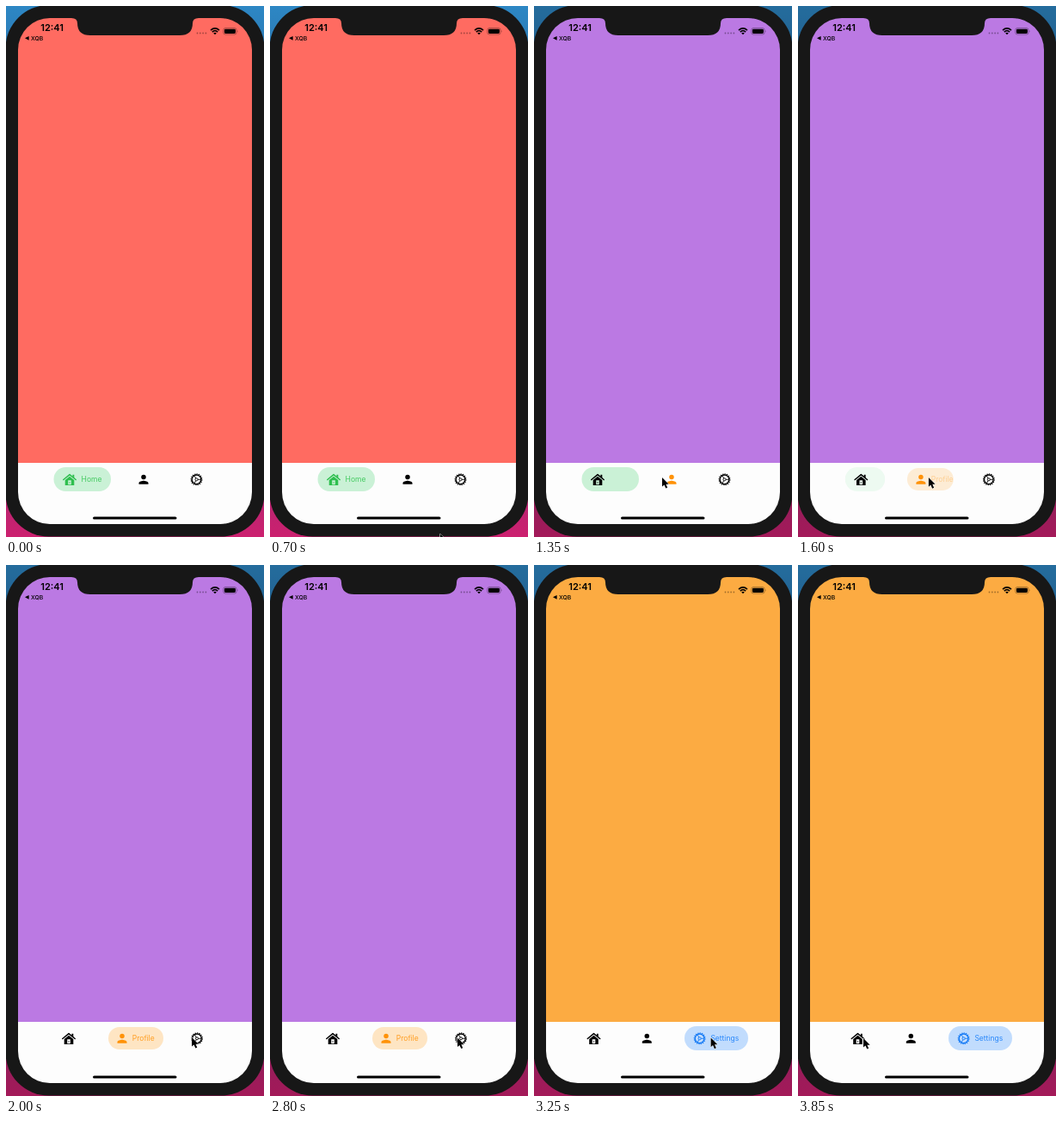
An HTML page that plays this animation: 300 by 616 pixels, repeating every 3.9 s.

```html
<!DOCTYPE html>
<html lang="en">
<head>
<meta charset="utf-8">
<title>Tab bar</title>
<style>
  html, body { margin: 0; width: 100%; height: 100%; overflow: hidden; }
  svg { display: block; width: 300px; height: 616px; font-family: Inter, "Liberation Sans", sans-serif; }
</style>
</head>
<body>
<svg viewBox="0 0 300 616" xmlns="http://www.w3.org/2000/svg">
  <defs>
    <linearGradient id="wall" x1="0" y1="0" x2="0" y2="1">
      <stop offset="0" stop-color="#2d87c4"/>
      <stop offset=".4" stop-color="#2a4c80"/>
      <stop offset="1" stop-color="#cc206f"/>
    </linearGradient>
    <clipPath id="display"><rect x="14" y="14" width="272" height="587" rx="37"/></clipPath>
  </defs>

  <rect width="300" height="616" fill="url(#wall)"/>
  <rect id="shade" width="300" height="616" fill="#000"/>
  <rect x="-.5" y="-1" width="301" height="616.5" rx="50" fill="#171717"/>

  <g clip-path="url(#display)">
    <rect id="page" x="14" y="14" width="272" height="516"/>
    <rect x="14" y="530" width="272" height="72" fill="#fdfdfd"/>
  </g>
  <path fill="#171717" d="M76 13V14Q83 14 83 20Q83 34 98 34H202Q217 34 217 20Q217 14 224 14V13Z"/>

  <text x="40.3" y="29" font-size="11" font-weight="600">12:41</text>
  <path d="M22 37.3L26.6 34.9V39.7Z"/>
  <text x="29" y="39.8" font-size="6.8" font-weight="500">XQB</text>
  <g fill="#000" fill-opacity=".35">
    <circle cx="222.5" cy="31.5" r=".9"/><circle cx="225.8" cy="31.5" r=".9"/>
    <circle cx="229.1" cy="31.5" r=".9"/><circle cx="232.4" cy="31.5" r=".9"/>
  </g>
  <g fill="none" stroke="#000" stroke-width="1.6">
    <path d="M238 28.1Q243 23.7 248 28.1"/>
    <path d="M239.8 30.1Q243 27.3 246.2 30.1"/>
  </g>
  <path d="M241.2 31.4Q243 30 244.8 31.4L243 33.3Z"/>
  <rect x="252.8" y="25.6" width="15.2" height="7.4" rx="2.2" fill="none" stroke="#000" stroke-opacity=".45" stroke-width=".7"/>
  <rect x="253.9" y="26.7" width="13" height="5.2" rx="1.3"/>
  <path d="M268.9 28V30.6Q270 29.3 268.9 28Z" fill-opacity=".5"/>

  <g id="tabs"></g>
  <rect x="101" y="592.4" width="97.5" height="3.2" rx="1.6"/>
  <path id="cursor" d="M0 0V10.6L2.4 8.4L4.3 12.6L6.2 11.8L4.4 7.7H7.7Z" stroke="#fff" stroke-width=".9" paint-order="stroke"/>
</svg>

<script>
const LOOP = 3900, STEP = 50, MORPH = 400, MID = 549;
const $ = id => document.getElementById(id);

const houseIcon = `
  <path d="M-7.2 .2L0 -5.7L7.2 .2" fill="none" stroke="currentColor" stroke-width="1.5" stroke-linecap="round" stroke-linejoin="round"/>
  <path d="M3.4 -5.6H5.3V-1.4L3.4 -3Z"/>
  <path fill-rule="evenodd" d="M0 -3.6L5.3 .8V6.7H-5.3V.8ZM-1.8 1V6H1.8V1Z"/>
  <circle cy="3.6" r=".7"/>`;
const personIcon = `
  <path transform="scale(.69) translate(-12 -12)" d="M12 12a4 4 0 1 0 0-8a4 4 0 0 0 0 8zm0 2c-2.67 0-8 1.34-8 4v2h16v-2c0-2.66-5.33-4-8-4z"/>`;
const gearIcon = `
  <g fill="none" stroke="currentColor">
    <circle r="5.3" stroke-width="1.3"/>
    <circle r="6.3" stroke-width="1.3" pathLength="32" stroke-dasharray="1.1 .9"/>
    <circle r="1.5" stroke-width=".9"/>
    <path stroke-width=".9" d="M1.5 0H5M-.75 -1.3L-2.5 -4.33M-.75 1.3L-2.5 4.33"/>
  </g>`;

// x: icon centre for each selected tab
const tabs = [
  { label: "Home", icon: houseIcon, x: [74, 73, 69.5], pad: 18.5, open: 66.5, h: 28, gap: 13.6, ink: "#2fbf4f", text: "#46cb63", pill: "#caf1d6", page: "#ff6b61" },
  { label: "Profile", icon: personIcon, x: [160, 135, 131.3], pad: 16, open: 64, h: 26, gap: 11.8, ink: "#ff9208", text: "#ff9f24", pill: "#fee5c3", page: "#bb79e3" },
  { label: "Settings", icon: gearIcon, x: [221.5, 222, 192.6], pad: 17.6, open: 74, h: 28, gap: 12.8, ink: "#147af5", text: "#2a88fa", pill: "#c1dcfd", page: "#fcab42" }
];
const taps = [0, 1350, 2850];

// time, x, y of the pointer tip
const path = [
  [600, 205, 622], [1050, 149, 547], [1550, 149, 547], [1950, 216, 548],
  [2400, 218, 548.5], [3150, 218, 548.5], [3700, 76, 549], [LOOP, 76, 549]
];

$("tabs").innerHTML = tabs.map(t =>
  `<g><rect/><g class="icon" fill="currentColor">${t.icon}</g>` +
  `<text y="552.2" font-size="8.5" fill="${t.text}">${t.label}</text></g>`).join("");
tabs.forEach((t, i) => {
  const g = $("tabs").children[i];
  [t.rect, t.mark, t.name] = g.children;
  t.rect.setAttribute("fill", t.pill);
  t.rect.setAttribute("height", t.h);
  t.rect.setAttribute("y", MID - t.h / 2);
  t.rect.setAttribute("rx", t.h / 2);
});

const mix = (a, b, p) => a + (b - a) * p;
const clamp = p => Math.min(1, Math.max(0, p));
const ease = p => p * p * (3 - 2 * p);

function drawTabs(time) {
  const now = taps.filter(t => t <= time).length - 1;
  const was = Math.max(0, now - 1);
  const p = now ? ease(clamp((time - taps[now]) / MORPH)) : 1;
  $("page").setAttribute("fill", tabs[now].page);
  tabs.forEach((t, i) => {
    const x = mix(t.x[was], t.x[now], p);
    const on = i === now ? p : i === was ? 1 - p : 0;
    t.rect.setAttribute("x", x - t.pad);
    t.rect.setAttribute("width", mix(t.pad * 2, t.open, on));
    t.rect.setAttribute("opacity", on);
    t.mark.setAttribute("transform", `translate(${x} ${MID + .3})`);
    t.mark.style.color = i === now ? t.ink : "#000";
    t.name.setAttribute("x", x + t.gap);
    t.name.setAttribute("opacity", i === now ? clamp(p * 2 - 1) : 0);
  });
}

function drawCursor(time) {
  const k = path.findIndex(s => s[0] > time);
  $("cursor").style.display = k > 0 ? "" : "none";
  if (k < 1) return;
  const [a, b] = [path[k - 1], path[k]];
  const p = ease((time - a[0]) / (b[0] - a[0]));
  $("cursor").setAttribute("transform", `translate(${mix(a[1], b[1], p)} ${mix(a[2], b[2], p)})`);
}

function draw() {
  const time = Math.floor((performance.now() - start) % LOOP / STEP) * STEP;
  drawTabs(time);
  drawCursor(time);
  $("shade").setAttribute("opacity", time < 1250 ? 0 : .2);
  requestAnimationFrame(draw);
}
const start = performance.now();
draw();
</script>
</body>
</html>
```
